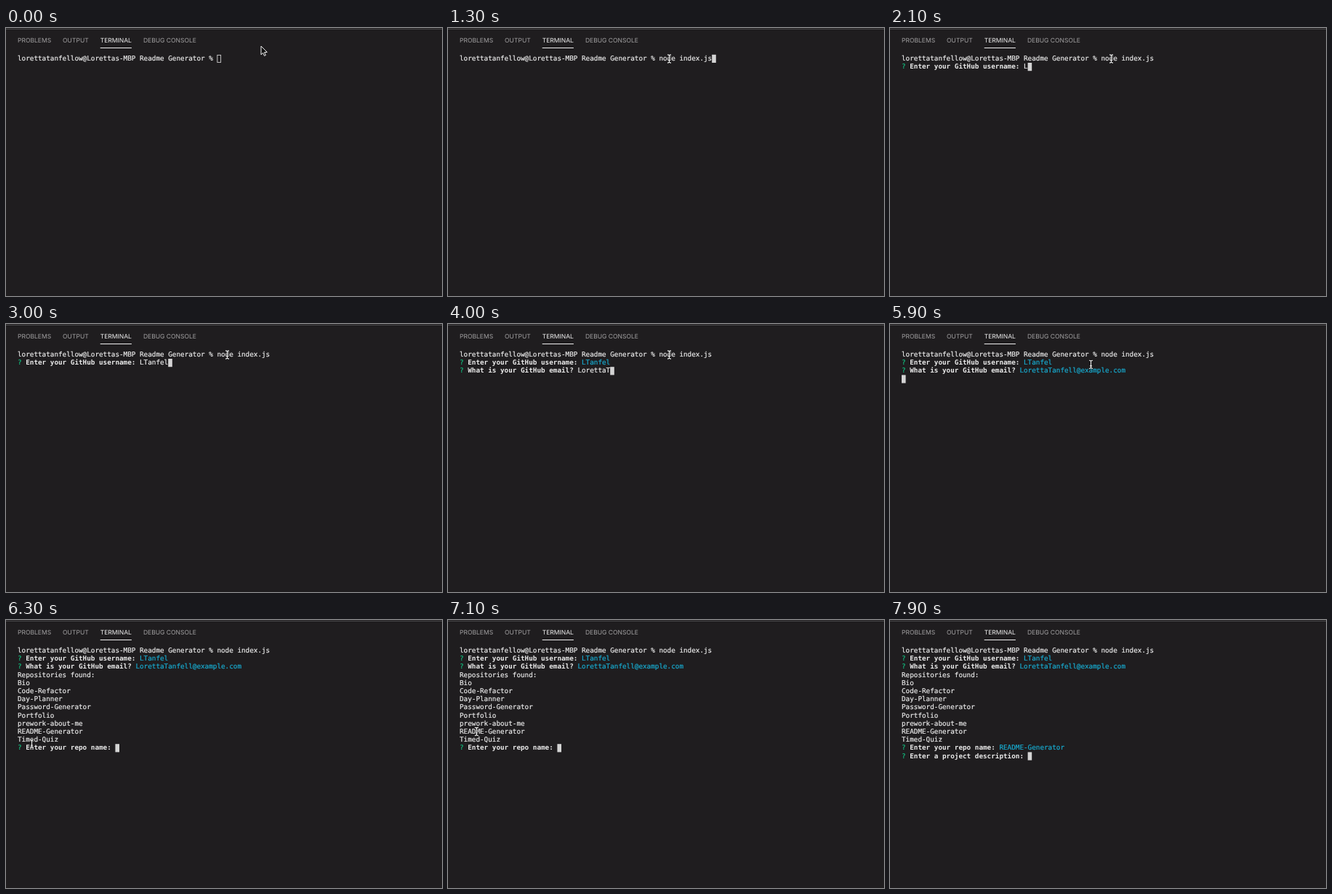
An HTML page with a canvas that plays this animation: 600 by 370 pixels, repeating every 8 s.

```html
<!DOCTYPE html>
<html lang="en">
<head>
<meta charset="utf-8">
<title>Terminal</title>
<style>
html, body { margin: 0; width: 100%; height: 100%; overflow: hidden; background: #1f1d1f; }
canvas { display: block; }
</style>
</head>
<body>
<canvas id="stage" width="600" height="370"></canvas>
<script>
const ctx = document.getElementById('stage').getContext('2d');
const LOOP = 8000, STEP = 100;
const LEFT = 16, TOP = 36.8, COL = 5.6, ROW = 11.2;
const MONO = '9.3px "DejaVu Sans Mono", monospace';
const SANS = '8.53px Inter, sans-serif';
const BG = '#1f1d1f', FG = '#ebebeb', DIM = '#a2a1a2', GREEN = '#12bd7e', CYAN = '#18abd0';

const PROMPT = 'lorettatanfellow@Lorettas-MBP Readme Generator % ';
const COMMAND = 'node index.js';
const USER = 'LTanfel', EMAIL = 'LorettaTanfell@example.com', REPO = 'README-Generator';
const REPOS = ['Bio', 'Code-Refactor', 'Day-Planner', 'Password-Generator', 'Portfolio',
  'prework-about-me', REPO, 'Timed-Quiz'];
const TABS = ['PROBLEMS', 'OUTPUT', 'TERMINAL', 'DEBUG CONSOLE'];
const ACTIVE = 'TERMINAL', TAB_GAP = 16;

const FOCUS = 400, RUN = 1500, ASK_USER = 1700, ASK_EMAIL = 3100, FETCH = 5900,
  ASK_REPO = 6100, PASTE = 7400, ASK_ABOUT = 7600;

const POINTER_START = { x: 351, y: 25 };
const MOVES = [
  { from: 0, to: 400, x: 304.5, y: 42.5 },
  { from: 5800, to: 6300, x: 35.5, y: 171 },
  { from: 6500, to: 6900, x: 16, y: 154 },
  { from: 7000, to: 7300, x: 106, y: 154 },
];

const progress = (t, from, to) => Math.min(1, Math.max(0, (t - from) / (to - from)));
const smooth = p => p * p * (3 - 2 * p);

// Types text at an even pace between two times.
const typed = (text, t, from, to) =>
  text.slice(0, Math.floor(text.length * progress(t, from, to) + 1e-6));

// Prints on the character grid and returns the next column.
function print(text, col, row, color = FG, bold = false) {
  ctx.font = (bold ? 'bold ' : '') + MONO;
  ctx.fillStyle = ctx.strokeStyle = color;
  ctx.lineWidth = 0.2;
  for (const ch of text) {
    const x = LEFT + col++ * COL, y = TOP + 8.2 + row * ROW;
    ctx.fillText(ch, x, y);
    if (!bold) ctx.strokeText(ch, x, y);
  }
  return col;
}

function ask(question, answer, row, done) {
  print('?', 0, row, GREEN);
  const col = print(question + ' ', 2, row, FG, true);
  return print(answer, col, row, done ? CYAN : FG);
}

function drawTerminal(t) {
  let row = 0;
  let col = print(PROMPT + typed(COMMAND, t, 500, 1300), 0, 0);
  if (t >= RUN) {
    row = 1;
    col = 0;
  }
  if (t >= ASK_USER) {
    const name = typed(USER.slice(0, 4), t, 1800, 2600) + typed(USER.slice(4), t, 2700, 3000);
    col = ask('Enter your GitHub username:', name, row, t >= ASK_EMAIL);
  }
  if (t >= ASK_EMAIL) {
    row = 2;
    col = ask('What is your GitHub email?', typed(EMAIL, t, 3200, 5800), row, t >= FETCH);
  }
  if (t >= FETCH) {
    row = 3;
    col = 0;
  }
  if (t >= ASK_REPO) {
    for (const line of ['Repositories found:', ...REPOS]) print(line, 0, row++);
    col = ask('Enter your repo name:', t >= PASTE ? REPO : '', row, t >= ASK_ABOUT);
  }
  if (t >= ASK_ABOUT) col = ask('Enter a project description:', '', ++row, false);
  drawCaret(col, row, t >= FOCUS);
}

function drawCaret(col, row, focused) {
  const x = LEFT + col * COL, y = TOP + row * ROW;
  if (focused) {
    ctx.fillStyle = '#d4d4d4';
    ctx.fillRect(x, y, COL, ROW);
  } else {
    ctx.strokeStyle = '#cfcfcf';
    ctx.lineWidth = 0.9;
    ctx.strokeRect(x + 0.4, y + 0.6, COL - 0.8, ROW - 1.2);
  }
}

function drawTabs() {
  ctx.fillStyle = '#4a494b';
  ctx.fillRect(0, 1, 600, 1);
  ctx.font = SANS;
  let x = LEFT;
  for (const name of TABS) {
    const width = ctx.measureText(name).width;
    ctx.fillStyle = name === ACTIVE ? '#f0f0f0' : DIM;
    ctx.fillText(name, x, 20);
    if (name === ACTIVE) ctx.fillRect(x, 27, width, 1);
    x += width + TAB_GAP;
  }
}

function drawArrow(x, y) {
  ctx.save();
  ctx.translate(x, y);
  ctx.fillStyle = '#101010';
  ctx.strokeStyle = '#f2f2f2';
  ctx.lineWidth = 1;
  const shape = new Path2D('M0 0V11.8L2.7 9.3 4.5 13.4 6.4 12.6 4.6 8.6 8.3 8.4Z');
  ctx.fill(shape);
  ctx.stroke(shape);
  ctx.restore();
}

function drawBeam(x, y) {
  ctx.beginPath();
  for (const side of [-1, 1]) {
    const end = y + side * 5.6;
    ctx.moveTo(x - 2.5, end);
    ctx.quadraticCurveTo(x, end, x, y + side * 4);
    ctx.quadraticCurveTo(x, end, x + 2.5, end);
  }
  ctx.moveTo(x, y - 4.5);
  ctx.lineTo(x, y + 4.5);
  ctx.moveTo(x - 1.5, y + 2);
  ctx.lineTo(x + 1.5, y + 2);
  for (const [color, width] of [['#1a1a1a', 2.2], ['#f0f0f0', 1.1]]) {
    ctx.strokeStyle = color;
    ctx.lineWidth = width;
    ctx.stroke();
  }
}

// An arrow over the tabs, a text beam over the terminal, hidden after pasting.
function drawPointer(t) {
  if (t >= PASTE) return;
  let { x, y } = POINTER_START;
  for (const move of MOVES) {
    const p = smooth(progress(t, move.from, move.to));
    x += (move.x - x) * p;
    y += (move.y - y) * p;
  }
  (y < 35 ? drawArrow : drawBeam)(x, y);
}

function draw(t) {
  ctx.fillStyle = BG;
  ctx.fillRect(0, 0, 600, 370);
  drawTabs();
  drawTerminal(t);
  drawPointer(t);
}

const start = performance.now();
function tick() {
  const elapsed = (performance.now() - start) % LOOP;
  draw(Math.floor(elapsed / STEP) * STEP);
  requestAnimationFrame(tick);
}

ctx.textRendering = 'geometricPrecision';
tick();
</script>
</body>
</html>
```
